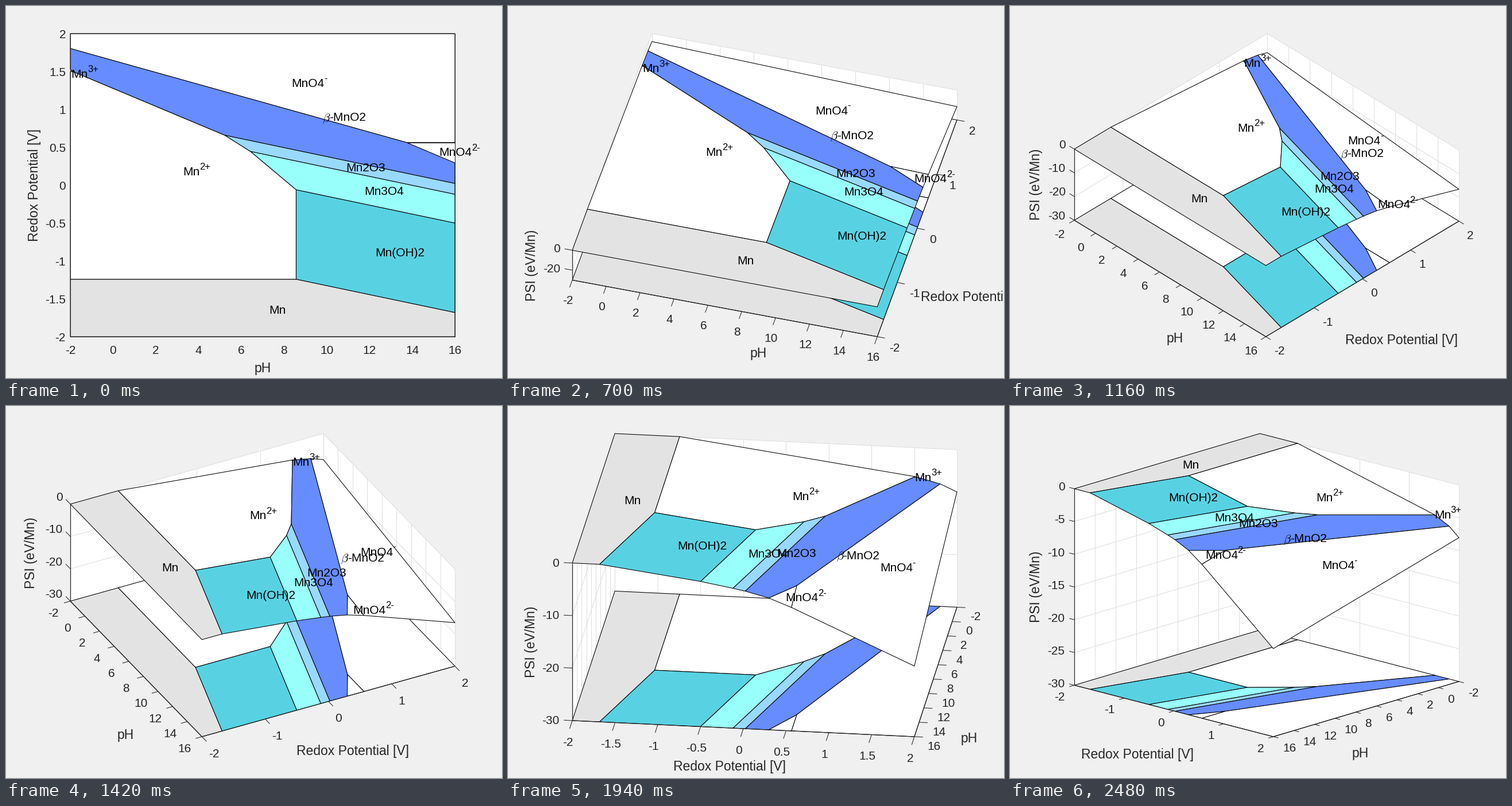
These frames come from a looping animation (864 by 648 pixels, 2500 ms). A matplotlib script:

```python
import numpy as np
import matplotlib.pyplot as plt
from matplotlib.animation import FuncAnimation
from matplotlib.collections import LineCollection, PolyCollection

W, H, DPI = 864, 648, 150
STEP_MS, HOLD, TURNS = 20, 25, 100
LO, HI = np.array([-2, -2, -30.0]), np.array([16, 2, 0.0])
LEFT, RIGHT, TOP, BOTTOM = 112, 782, 48, 576
INK, GRID, PAPER = "#262626", "#dedede", "#f0f0f0"
NERNST = 0.0591

plt.rcParams["font.family"] = "Liberation Sans"
plt.rcParams["mathtext.fontset"] = "cm"

# name, superscript, colour, energy constant, electrons, protons
SPECIES = [
    ("Mn", "", "#e3e3e3", 0, 0, 0),
    ("Mn", "2+", "#ffffff", -2.484, 2, 0),
    ("Mn", "3+", "#ffffff", -0.984, 3, 0),
    ("Mn(OH)2", "", "#58d2e2", -1.471, 2, 2),
    ("Mn3O4", "", "#99fffa", -1.174, 8 / 3, 8 / 3),
    ("Mn2O3", "", "#99d8ff", -0.899, 3, 3),
    ("-MnO2", "", "#668cff", 0.069, 4, 4),
    ("MnO4", "-", "#ffffff", 5.008, 7, 8),
    ("MnO4", "2-", "#ffffff", 4.446, 6, 8),
]
EM = {"M": 0.833, "n": 0.556, "O": 0.778, "4": 0.556}
FONT_PX = 10 * DPI / 72


def energy_plane(species):
    a, electrons, protons = species[3:]
    return np.array([a, -protons * NERNST, -electrons])


def clip(poly, plane):
    """Keep the part of a polygon where the plane is not positive."""
    out = []
    for p, q in zip(poly, poly[1:] + poly[:1]):
        fp, fq = (plane[0] + plane[1:] @ r for r in (p, q))
        if fp <= 0:
            out.append(p)
        if fp * fq < 0:
            out.append(p + (q - p) * fp / (fp - fq))
    return out


def stable_region(k):
    own = energy_plane(SPECIES[k])
    poly = [np.array(c, float) for c in ((-2, -2), (16, -2), (16, 2), (-2, 2))]
    for j, other in enumerate(SPECIES):
        if j != k:
            poly = clip(poly, own - energy_plane(other))
    return np.array([[x, y, own[0] + own[1] * x + own[2] * y] for x, y in poly])


REGIONS = [stable_region(k) for k in range(len(SPECIES))]
FLOORS = [np.column_stack([r[:, :2], np.full(len(r), LO[2])]) for r in REGIONS]
COLORS = [s[2] for s in SPECIES]
ANCHORS = [r.mean(axis=0) + [0, 0, 0.5] for r in REGIONS]
ANCHORS[6] = np.array([9.79, 0.913, -4.6])


def make_view(az, el, right):
    """Orthographic view whose bounding box fills the plot area."""
    c, s = np.cos(np.radians(az)), np.sin(np.radians(az))
    ce, se = np.cos(np.radians(el)), np.sin(np.radians(el))
    turn = np.array([[c, s, 0], [-s * se, c * se, ce]])

    def flat(p):
        return (np.asarray(p, float) - LO) / (HI - LO) @ turn.T

    corners = flat([[x, y, z] for x in (-2, 16) for y in (-2, 2) for z in (-30, 0)])
    low, high = corners.min(axis=0), corners.max(axis=0)
    start = np.array([LEFT, BOTTOM])
    size = np.array([right - LEFT, TOP - BOTTOM])
    return lambda p: start + (flat(p) - low) / (high - low) * size


fig = plt.figure(figsize=(W / DPI, H / DPI), dpi=DPI, facecolor=PAPER)
ax = fig.add_axes([0, 0, 1, 1])
ax.set_xlim(0, W)
ax.set_ylim(H, 0)
ax.axis("off")
live = []


def show(artist):
    """Stack artists strictly in the order they are drawn."""
    artist.set_zorder(len(live) + 1)
    live.append(artist)


def text(x, y, s, ha="center", size=10, color=INK):
    show(ax.text(x, y + 0.73 * size, s, ha=ha, va="baseline",
                 fontsize=size, color=color))


def upright(x, y, s):
    show(ax.text(x, y, s, ha="center", va="center", rotation=90,
                 fontsize=11, color=INK))


def lines(segments, color=INK, width=0.5):
    show(ax.add_collection(LineCollection(
        segments, colors=color, linewidths=width, capstyle="butt")))


def faces(polys, colors, edge="black"):
    show(ax.add_collection(PolyCollection(
        polys, facecolors=colors, edgecolors=edge, linewidths=0.5)))


def ticks(lo, hi, step):
    first = int(np.ceil(lo / step - 1e-9))
    last = int(np.floor(hi / step + 1e-9))
    return [k * step for k in range(first, last + 1)]


def unit(v):
    return v / np.hypot(*v)


def length(view, p, q):
    return np.hypot(*(view(q) - view(p)))


def species_labels(view):
    for k, (name, sup, *_) in enumerate(SPECIES):
        x, y = view(ANCHORS[k])
        y += 4.7 if sup else 1.5
        if k == 6:
            text(x, y, r"$\beta$", "left", color="black")
            x += 12
        text(x, y, name, "left", color="black")
        if sup:
            x += FONT_PX * sum(EM[c] for c in name)
            text(x, y - 8, sup, "left", size=8, color="black")


def tick_label(end, out, value, steep, slot=0):
    """Label beyond a tick; a slot width centres labels that go left."""
    s = f"{value:g}"
    if steep:
        text(end[0] + 9 * np.sign(out[0]), end[1] + 1, s,
             "left" if out[0] > 0 else "right")
        return
    y = end[1] + 14.5 + 8 * abs(out[1])
    pad = 14 * abs(out[0]) - 6
    if abs(out[0]) < 0.4:
        text(end[0] + 9 * out[0] * (abs(out[0]) > 0.1), y, s)
    elif out[0] > 0:
        text(end[0] + pad, y, s, "left")
    elif slot:
        text(end[0] - pad - slot / 2, y, s)
    else:
        text(end[0] - pad, y, s, "right")


def draw_flat():
    view = make_view(0, 90, RIGHT)
    faces([view(r) for r in REGIONS], COLORS)
    box = view([[-2, -2, 0], [16, -2, 0], [16, 2, 0], [-2, 2, 0], [-2, -2, 0]])
    lines([box, [(RIGHT, BOTTOM - 7), (RIGHT, BOTTOM)]])
    for v in ticks(-2, 16, 2):
        text(view([v, -2, 0])[0], 599, f"{v:g}")
    for v in ticks(-2, 2, 0.5):
        text(104, view([-2, v, 0])[1] + 1, f"{v:g}", "right")
    text(447, 630, "pH", size=11)
    upright(50, 312, "Redox Potential [V]")
    species_labels(view)


# where axis titles sit relative to the middle of their axis, by turn number
PH_KEYS = ([1, 22, 47, 67, 68, 73, 90, 100],
           [81, 33, -18, -60, 66, 58, 12, -10],
           [62, 94, 114, 120, 120, 115, 89, 76])
V_KEYS = ([5, 22, 47, 73, 90, 100],
          [110, 93, 42, -24, -45, -63],
          [115, 125, 85, 65, 74, 75])


def title_shift(n, keys):
    return np.array([np.interp(n, keys[0], keys[1]), np.interp(n, keys[0], keys[2])])


def draw_turned(n):
    az, el = 1.33 * n, 90 - 0.69 * n
    front = az < 90
    v_near = -2 if front else 2
    v_steep = front and np.tan(np.radians(az)) < 0.1
    view = make_view(az, el, RIGHT - 13 if v_steep else RIGHT)

    near, ph_far = [16, v_near, -30], [-2, v_near, -30]
    v_far = [16, -v_near, -30]
    ph_len, v_len = length(view, near, ph_far), length(view, near, v_far)
    z_len = length(view, near, [16, v_near, 0])
    ph_run = np.abs(view(near) - view(ph_far))
    ph_steep = ph_run[0] < 0.1 * ph_run[1]
    tick = 0.025 * max(ph_len, v_len)

    v_ticks = ticks(-2, 2, 0.5 if v_len > 480 else 1)
    z_ticks = ticks(-30, 0, 5 if z_len > 290 else 10 if z_len > 60 else 20)
    ph_ticks = ticks(-2, 16, 2)

    # back walls and their grid
    v_back = -v_near
    wall_a = [[-2, -2, -30], [-2, 2, -30], [-2, 2, 0], [-2, -2, 0]]
    wall_b = [[-2, v_back, -30], [16, v_back, -30], [16, v_back, 0], [-2, v_back, 0]]
    faces([view(wall_a), view(wall_b)], "white", "none")
    grid = [[[-2, v, -30], [-2, v, 0]] for v in v_ticks]
    grid += [[[p, v_back, -30], [p, v_back, 0]] for p in ph_ticks]
    for z in z_ticks:
        grid += [[[-2, -2, z], [-2, 2, z]], [[-2, v_back, z], [16, v_back, z]]]
    lines([view(g) for g in grid], GRID)

    # axis lines lie under the raised surface, ticks point outwards
    out_ph = unit(view(near) - view(v_far))
    out_v = unit(view(near) - view(ph_far))
    side = -2 if front else 16
    neighbour = [16, -2, -30] if front else [16, 2, -30]
    out_z = unit(view([side, -2, -30]) - view(neighbour))
    show_z = z_len > 12

    faces([view(f) for f in FLOORS], COLORS)
    axes_lines = [view([near, ph_far]), view([near, v_far])]
    if show_z:
        axes_lines.append(view([[side, -2, -30], [side, -2, 0]]))
    lines(axes_lines, width=0.6)
    faces([view(r) for r in REGIONS], COLORS)

    marks = []
    for v in ph_ticks:
        p = view([v, v_near, -30])
        marks.append([p, p + tick * out_ph])
        tick_label(marks[-1][1], out_ph, v, ph_steep, slot=1.112 * FONT_PX)
    for v in v_ticks:
        p = view([16, v, -30])
        marks.append([p, p + tick * out_v])
        tick_label(marks[-1][1], out_v, v, v_steep)
    if show_z:
        for v in z_ticks:
            p = view([side, -2, v])
            end = p + tick * out_z
            marks.append([p, end])
            text(end[0] - 8 * abs(out_z[0]), end[1] - 7 * abs(out_z[1]),
                 f"{v:g}", "right")
        upright(54.5 - 0.95 * tick, view([side, -2, -15])[1], "PSI (eV/Mn)")
    lines(marks)

    ph_mid, v_mid = view([7, v_near, -30]), view([16, 0, -30])
    if ph_steep:
        upright(ph_mid[0] + 70 * np.sign(out_ph[0]), ph_mid[1], "pH")
    else:
        text(*(ph_mid + title_shift(n, PH_KEYS)), "pH", size=11)
    if v_steep:
        upright(v_mid[0] + 90, v_mid[1] + 2, "Redox Potential [V]")
    else:
        text(*(v_mid + title_shift(n, V_KEYS)), "Redox Potential [V]", size=11)
    species_labels(view)


def draw(i):
    while live:
        live.pop().remove()
    n = max(0, i - HOLD + 1)
    if n:
        draw_turned(n)
    else:
        draw_flat()
    return live


anim = FuncAnimation(fig, draw, frames=HOLD + TURNS, interval=STEP_MS,
                     repeat=True, repeat_delay=0, blit=False)
plt.show()
```
